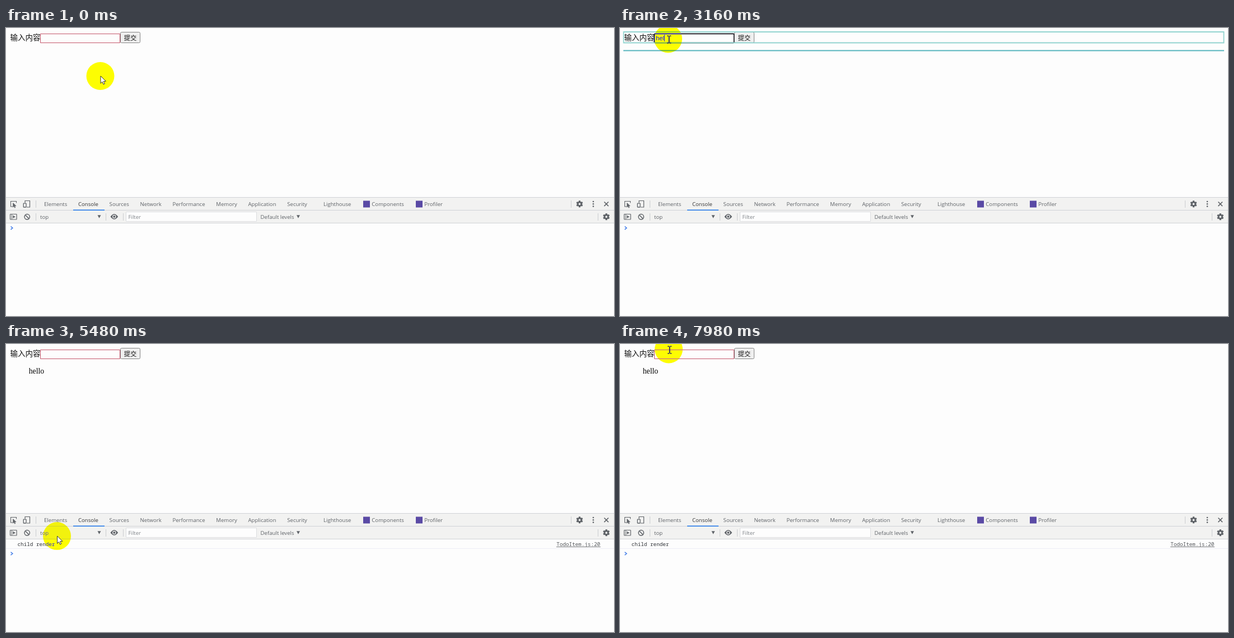
These frames come from a looping animation (1086x516 px, 8 s). An HTML page with a canvas:

```html
<!DOCTYPE html>
<html lang="zh-CN">
<head>
<meta charset="utf-8">
<title>Todo list console</title>
<style>
html, body { margin: 0; width: 100%; height: 100%; overflow: hidden; background: #fdfdfd; }
canvas { display: block; width: 1086px; height: 516px; }
</style>
</head>
<body>
<canvas id="stage" width="1086" height="516"></canvas>
<script>
const ctx = document.getElementById('stage').getContext('2d');
const LOOP = 8000, FOCUS = 800, SUBMIT = 5060, FLASH = 240;
const CJK = '"Noto Sans CJK SC", "Noto Sans CJK", sans-serif';
const UI = '9.6px "Open Sans", "Noto Sans", sans-serif';
const MONO = '9.3px "Noto Sans Mono", monospace';
const GREY = '#5f6368', BAR = '#f2f2f1', TEAL = '#92d4d0';

const WORD = 'hello';
const keys = [2320, 2600, 3000, 3200, 3760];

// Pointer moves: start, end, x, y; it rests in between
const home = { x: 168.5, y: 86 };
const moves = [
  [20, 440, 86, 19.5],
  [4330, 4760, 218, 21],
  [5180, 5640, 42, 469],
  [5640, 5920, 37.5, 438],
  [5920, 6240, 48, 366],
  [6240, 6640, 28, 416],
  [6640, 6920, 33, 370],
  [7040, 7480, 193, 172],
  [7480, 7600, 172, 92],
  [7800, 7980, 87, 9.5]
];

function pointerAt(t) {
  let { x, y } = home;
  for (const [from, to, tx, ty] of moves) {
    const u = Math.min(1, Math.max(0, (t - from) / (to - from)));
    const e = u * u * (3 - 2 * u);
    x += (tx - x) * e;
    y += (ty - y) * e;
  }
  return { x, y };
}

function rect(x, y, w, h, color) {
  ctx.fillStyle = color;
  ctx.fillRect(x, y, w, h);
}

function text(s, x, y, font, color) {
  ctx.font = font;
  ctx.fillStyle = color;
  ctx.fillText(s, x, y);
  return x + ctx.measureText(s).width;
}

function stroke(color, width) {
  ctx.strokeStyle = color;
  ctx.lineWidth = width;
  ctx.stroke();
}

function box(x, y, w, h, r, color, width = 1, fill) {
  ctx.beginPath();
  ctx.roundRect(x, y, w, h, r);
  if (fill) { ctx.fillStyle = fill; ctx.fill(); }
  stroke(color, width);
}

function trace(points) {
  ctx.beginPath();
  points.forEach(p => ctx.lineTo(...p));
}

function line(points, color, width = 1) {
  trace(points);
  stroke(color, width);
}

function poly(points, color) {
  trace(points);
  ctx.fillStyle = color;
  ctx.fill();
}

function disc(x, y, r, color) {
  ctx.beginPath();
  ctx.arc(x, y, r, 0, 7);
  ctx.fillStyle = color;
  ctx.fill();
}

function ring(x, y, r, color, width) {
  ctx.beginPath();
  ctx.arc(x, y, r, 0, 7);
  stroke(color, width);
}

function at(x, y, scale, draw) {
  ctx.save();
  ctx.translate(x, y);
  ctx.scale(scale, scale);
  draw();
  ctx.restore();
}

function gear(x, y) {
  at(x, y, 1, () => {
    for (let i = 0; i < 6; i++) {
      rect(-1.6, -6, 3.2, 4, GREY);
      ctx.rotate(Math.PI / 3);
    }
  });
  ring(x, y, 3.3, GREY, 2.6);
}

function dropdown(x, y) {
  poly([[x - 3, y - 2.8], [x + 3, y - 2.8], [x, y + 2.8]], GREY);
}

function arrow(x, y, scale, fill, edge) {
  const shape = [[0, 0], [0, 13.2], [3, 10.4], [5, 15], [7.2, 14], [5.2, 9.6], [9.4, 9.4], [0, 0]];
  at(x, y, scale, () => {
    poly(shape, fill);
    line(shape, edge, 0.9);
  });
}

function page(t, hover) {
  rect(0, 0, 1086, 516, '#fdfdfd');
  text('输入内容', 7.5, 21.9, '300 13.5px ' + CJK, '#111');

  if (t >= FOCUS && t < SUBMIT) {
    box(61.2, 10.4, 142.6, 16.2, 1.5, '#101018', 1.9, '#fdfdfd');
    const typed = WORD.slice(0, keys.filter(k => t >= k).length);
    const end = text(typed, 64, 22, '11.3px "Liberation Sans", Arial, sans-serif', '#111');
    if (t < 1320 || t >= 1840) rect(Math.floor(end), 12, 1, 12, '#333');
  } else {
    box(61.5, 10.5, 142, 16, 0, '#c4566a', 1, '#fdfdfd');
  }

  box(204.5, 7.5, 35, 19, 2, '#858585', 1, hover ? '#dedede' : '#efefef');
  text('提交', 210.8, 21.5, '300 11.3px ' + CJK, '#111');
  if (t >= SUBMIT) text(WORD, 40.8, 53, '13.6px "Liberation Serif", Times, serif', '#000');

  // Outlines of the parts that were just updated
  if ([...keys, SUBMIT].some(k => t >= k && t < k + FLASH)) {
    box(6.5, 7, 1072, 19.5, 0, TEAL, 1.8);
    if (t < SUBMIT) rect(6, 39.5, 1073, 2, '#58b5bd');
    else box(6.5, 40.5, 1072, 16, 0, TEAL, 1.8);
  }
}

function tabs() {
  let x = 68;
  for (const name of 'Elements Console Sources Network Performance Memory Application Security'.split(' ')) {
    const active = name === 'Console';
    const end = text(name, x, 319, UI, active ? '#333' : GREY);
    if (active) rect(Math.round(x - 9.5), 325.5, 56, 1.5, '#1a73e8');
    x = end + 19.7;
  }
  x = text('Lighthouse', 567, 319, UI, GREY);
  for (const name of ['Components', 'Profiler']) {
    x = Math.round(x + 21.3);
    rect(x, 309.5, 12, 12, '#5a4aa5');
    x = text(name, x + 15.3, 319, UI, GREY);
  }
}

function tabBar() {
  rect(0, 303, 1086, 47, BAR);
  for (const y of [303, 326, 349]) rect(0, y, 1086, 1, '#d0d2d6');
  for (const x of [53, 1009]) rect(x, 309, 1, 13, '#cbcdd0');
  for (const x of [53, 178, 209, 1057]) rect(x, 332, 1, 13, '#cbcdd0');

  // Inspect and device buttons
  line([[12, 320], [8.5, 320], [8.5, 310.5], [18.5, 310.5], [18.5, 313.5]], GREY, 1.1);
  arrow(12.5, 313.2, 0.6, GREY, GREY);
  line([[34, 313], [34, 309.5], [42.5, 309.5], [42.5, 321], [37, 321]], GREY, 1.2);
  box(31.2, 314.2, 4.8, 6.8, 0.5, GREY, 1.3);

  tabs();
  gear(1024.5, 315.3);
  for (const dy of [-4.3, 0, 4.3]) disc(1049, 315.3 + dy, 1.3, GREY);
  for (const d of [-3.8, 3.8]) line([[1072.3 - d, 311.5], [1072.3 + d, 319.1]], GREY, 1.6);
}

function filterBar() {
  box(7.5, 333.5, 11.5, 9.5, 0.5, GREY, 1.2);
  line([[10.3, 333.5], [10.3, 343]], GREY);
  poly([[12.3, 335.5], [16.8, 338.2], [12.3, 341]], GREY);
  ring(37.7, 338.3, 4.7, GREY, 1.5);
  line([[34.4, 335], [41, 341.6]], GREY, 1.5);
  text('top', 61, 342, UI, GREY);
  dropdown(166.5, 338);

  // Eye
  ctx.beginPath();
  ctx.moveTo(186.5, 338);
  ctx.quadraticCurveTo(193.3, 328.6, 200.2, 338);
  ctx.quadraticCurveTo(193.3, 347.4, 186.5, 338);
  ctx.fillStyle = GREY;
  ctx.fill();
  ring(193.3, 338, 2.6, BAR, 1.2);

  box(214.5, 329.5, 233, 17, 0, '#dcdde0', 1, '#fdfdfd');
  text('Filter', 218.5, 342, UI, '#80858a');
  text('Default levels', 454.6, 342, UI, GREY);
  dropdown(522, 338);
  gear(1072.3, 338.2);
}

function log(t) {
  let y = 358.3;
  if (t >= SUBMIT) {
    text('child render', 20.5, 362, MONO, '#303338');
    text('TodoItem.js:20', 983.3, 362, MONO, '#55585c');
    rect(983, 363, 79, 1, '#77797d');
    rect(0, 366, 1086, 1, '#ececf5');
    y = 375.5;
  }
  line([[8.5, y - 2.8], [11.8, y], [8.5, y + 2.8]], '#3b78e7', 1.5);
}

function beam(x, y) {
  const ink = '#14146e';
  rect(x - 0.8, y - 6, 1.7, 12, ink);
  for (const dy of [-7, 5.8])
    for (const dx of [-3.6, 0.7]) rect(x + dx, y + dy, 3, 1.3, ink);
}

function pointer(x, y) {
  // The spot inverts blue: white turns yellow, black turns blue
  ctx.globalCompositeOperation = 'difference';
  disc(x, y, 25, '#0000ff');
  ctx.globalCompositeOperation = 'source-over';

  const overInput = x > 61 && x < 204 && y > 9 && y < 28;
  const overLog = y > 350 && y < 384;
  if (overInput || overLog) beam(x + 1.6, y + 1);
  else arrow(x + 0.5, y, 1, '#fff', '#222');
}

function frame(t) {
  const { x, y } = pointerAt(t);
  page(t, x > 204 && x < 240 && y > 7 && y < 27);
  tabBar();
  filterBar();
  log(t);
  pointer(x, y);
}

let start;
function tick(now) {
  start ??= now;
  frame((now - start) % LOOP);
  requestAnimationFrame(tick);
}
requestAnimationFrame(tick);
</script>
</body>
</html>
```
